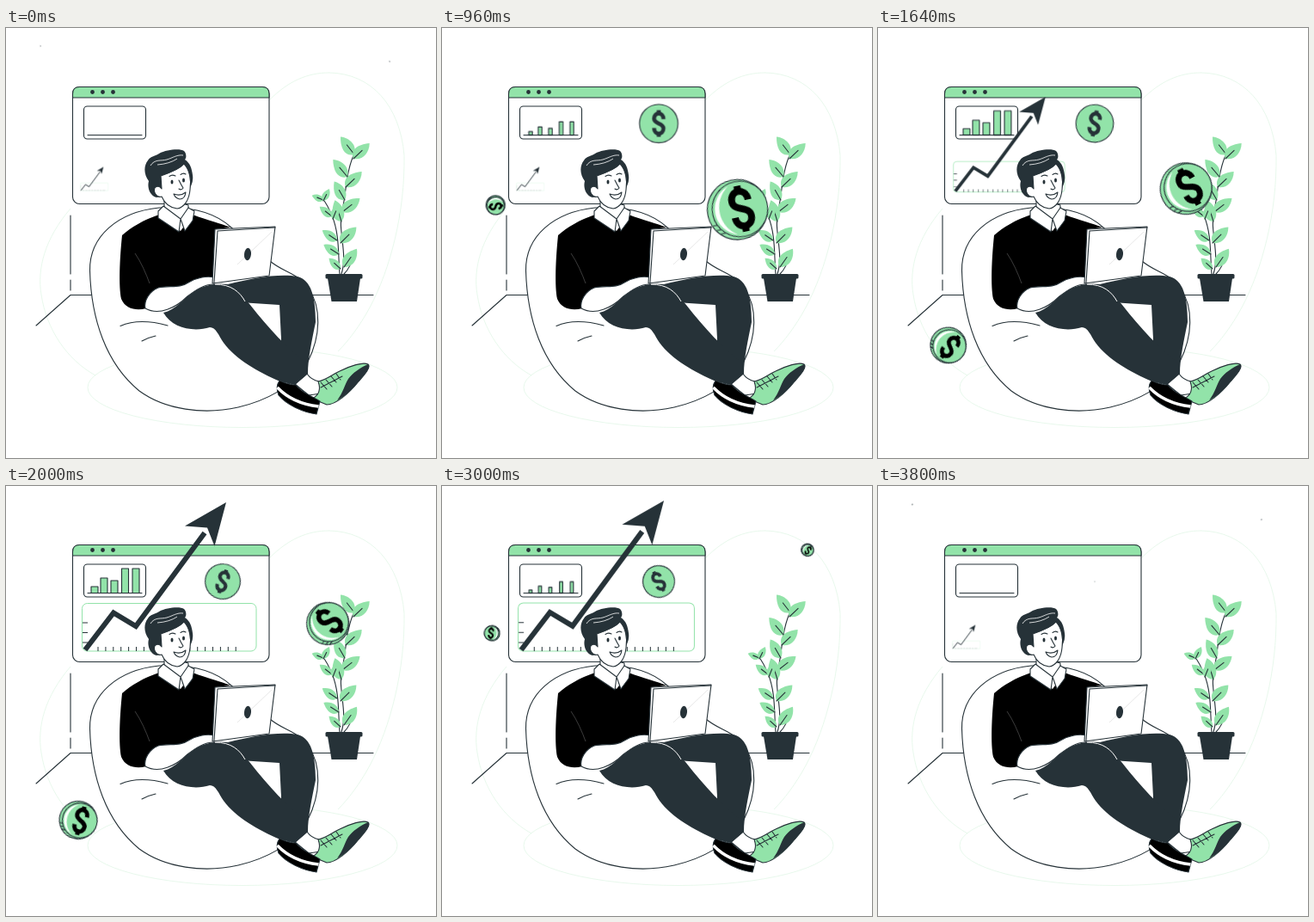
Animation of 500x500 px, one loop 3840 ms. Source, as an HTML page without scripts:

```html
<!DOCTYPE html>
<html lang="en">
<head>
<meta charset="utf-8">
<title>Growing income</title>
<style>
  html, body { margin: 0; width: 100%; height: 100%; overflow: hidden; background: #fff; }
  svg { display: block; width: 100%; height: 100%; }

  .ink { stroke: #263238; stroke-width: 1.1; stroke-linecap: round; stroke-linejoin: round; }
  .ink, .ink * { vector-effect: non-scaling-stroke; }
  .line { fill: none; }
  .white { fill: #fff; }
  .green { fill: #92e3a9; }
  .dark { fill: #263238; }
  .black { fill: #000; }
  .faint { fill: none; stroke: #e2f6e8; stroke-width: .8; }

  .move { animation: 3840ms cubic-bezier(.33, 0, .67, 1) infinite; }
  .spin { animation: 3840ms linear infinite; }

  .near { animation-name: near; }
  @keyframes near {
    0%, 100% { transform: translate(446px, 39px) scale(0); }
    25% { transform: translate(344px, 211px) scale(1); }
  }
  .near-spin { animation-name: near-spin; }
  @keyframes near-spin {
    0% { transform: rotate(-200deg); }
    16.67% { transform: rotate(-78deg); }
    25% { transform: rotate(-12deg); }
    33.33% { transform: rotate(-4deg); }
    52.08% { transform: rotate(-52deg); }
    62.5% { transform: rotate(0deg); }
    78.13% { transform: rotate(35deg); }
    100% { transform: rotate(80deg); }
  }

  .far { animation-name: far; }
  @keyframes far {
    0%, 100% { transform: translate(40px, 21px) scale(0); }
    50% { transform: translate(84.5px, 390.500px) scale(.63); }
  }
  .far-spin { animation-name: far-spin; }
  @keyframes far-spin {
    0% { transform: rotate(140deg); }
    16.67% { transform: rotate(100deg); }
    33.33% { transform: rotate(65deg); }
    52.08% { transform: rotate(15deg); }
    62.5% { transform: rotate(-40deg); }
    78.13% { transform: rotate(-175deg); }
    100% { transform: rotate(-330deg); }
  }

  .badge { animation-name: badge; }
  @keyframes badge {
    0%, 100% { transform: translate(252px, 111px) scale(0); }
    33.33% { transform: translate(252px, 111px) scale(1); }
    47%, 73% { transform: translate(252px, 111px) scale(.77); }
  }
  .badge-spin { animation-name: badge-spin; }
  @keyframes badge-spin {
    0%, 33.33% { transform: rotate(0deg); }
    52.08% { transform: rotate(18deg); }
    62.5% { transform: rotate(-35deg); }
    78.13%, 100% { transform: rotate(-28deg); }
  }

  .bar { animation-name: bar; transform-box: fill-box; transform-origin: 50% 100%; }
  @keyframes bar {
    0%, 2%, 94%, 100% { transform: scale(0); }
    45.5%, 60.5% { transform: scale(1); }
  }

  .chart { animation-name: chart; transform-origin: 86.2px 188.6px; }
  @keyframes chart {
    0%, 37.5%, 92.7%, 100% { transform: scale(.16); }
    47.9%, 82.3% { transform: scale(1.11); }
    52%, 77.1% { transform: scale(1); }
  }
</style>
</head>
<body>
<svg viewBox="0 0 500 500">
  <defs>
    <g id="dollar" fill="none" stroke-width="8">
      <path d="M9.500 -9C9.500 -24 -9.500 -24 -9.500 -10C-9.500 2 9.500 -2 9.500 10C9.500 24 -9.500 24 -9.500 9"/>
      <path d="M0 -27V-18M0 18V27"/>
    </g>
    <g id="coin">
      <circle class="ink green" cx="-.5" r="35"/>
      <path class="ink line" d="M-32 13L-27 13M-29 19L-24 19M-25 24L-20 24"/>
      <circle class="ink green" cx="2.500" r="32.300"/>
      <path class="white" d="M-6 -28.500A30 30 0 0 0 -6 28.500A34 34 0 0 1 -6 -28.500Z"/>
      <use href="#dollar" x="4.500" stroke="#000"/>
    </g>
    <g id="leaf">
      <path class="green" d="M0 0C-10 -4 -9 -15 0 -26C8 -18 9 -6 0 0Z"/>
      <path class="ink line" d="M0 0V-14"/>
    </g>
  </defs>

  <!-- backdrop -->
  <path class="faint" d="M75 210C45 245 36 280 41 310C47 350 70 385 104 404M306 84C328 62 350 52 376 52C425 53 458 90 463 148C464 215 447 280 423 325C411 347 398 364 386 376"/>
  <ellipse class="faint" cx="275" cy="418" rx="180" ry="46.5"/>
  <path class="ink line" d="M75 218V286M75 293V305M35 346L75 310.500H427"/>

  <!-- browser window -->
  <rect class="ink white" x="77.500" y="68.500" width="228.500" height="136" rx="8"/>
  <path class="ink green" d="M77.500 81V76.500Q77.500 68.500 85.500 68.500H298Q306 68.500 306 76.500V81Z"/>
  <g class="dark">
    <circle cx="100.500" cy="74.500" r="2.400"/><circle cx="112.500" cy="74.500" r="2.400"/><circle cx="124.500" cy="74.500" r="2.400"/>
  </g>
  <rect class="ink line" x="90.500" y="91" width="72" height="38" rx="4"/>
  <g class="ink green">
    <rect class="move bar" x="99" y="117" width="8" height="7.500"/>
    <rect class="move bar" x="110" y="107" width="8" height="17.500"/>
    <rect class="move bar" x="122" y="110" width="8" height="14.500"/>
    <rect class="move bar" x="134.500" y="96" width="8" height="28.500"/>
    <rect class="move bar" x="147" y="96" width="8" height="28.500"/>
  </g>
  <path class="ink line" d="M95 124.500H158"/>

  <g class="move badge"><g class="spin badge-spin">
    <circle class="ink green" r="26.500"/>
    <use href="#dollar" transform="scale(.68)" stroke="#263238"/>
  </g></g>

  <g class="move chart">
    <rect class="line" x="88.500" y="136.500" width="202.500" height="55.500" rx="6" stroke="#92e3a9"/>
    <path class="line" d="M92 187.500V148" stroke="#263238" stroke-width="6" stroke-dasharray="1 10.500" stroke-dashoffset="-5"/>
    <path class="line" d="M106.500 189.500H268" stroke="#263238" stroke-width="5" stroke-dasharray="1 7.900"/>
    <path class="line" d="M92 190.500L125 147.500L151 163L231 54.500" stroke="#263238" stroke-width="6"/>
    <path class="dark" d="M256 19L208 46.500L234 48.500L242.500 70Z"/>
  </g>

  <!-- plant -->
  <g class="ink line">
    <path d="M390 286C398 262 385 235 391 212C396 190 395 166 406 144"/>
    <path d="M388 286C386 262 388 240 379 218Q374 206 368 198"/>
    <path d="M393 286Q401 278 403 266"/>
  </g>
  <use href="#leaf" transform="translate(405 147) rotate(-38)"/>
  <use href="#leaf" transform="translate(404 152) rotate(46)"/>
  <use href="#leaf" transform="translate(397 173) rotate(-40)"/>
  <use href="#leaf" transform="translate(395 185) rotate(46)"/>
  <use href="#leaf" transform="translate(394 200) rotate(-30) scale(.95)"/>
  <use href="#leaf" transform="translate(391 214) rotate(52)"/>
  <use href="#leaf" transform="translate(390 225) rotate(-17)"/>
  <use href="#leaf" transform="translate(389 250) rotate(45)"/>
  <use href="#leaf" transform="translate(393 278) rotate(35)"/>
  <use href="#leaf" transform="translate(369 200) rotate(-68) scale(.55)"/>
  <use href="#leaf" transform="translate(369 201) rotate(26) scale(.6)"/>
  <use href="#leaf" transform="translate(379 219) rotate(-52) scale(.7)"/>
  <use href="#leaf" transform="translate(380 222) rotate(22) scale(.7)"/>
  <use href="#leaf" transform="translate(385 247) rotate(-56) scale(.8)"/>
  <use href="#leaf" transform="translate(387 263) rotate(-58) scale(.8)"/>
  <use href="#leaf" transform="translate(389 280) rotate(-48) scale(.7)"/>
  <rect class="dark" x="371.500" y="286" width="43" height="5.500" rx="1.500"/>
  <path class="dark" d="M374 291H412L408 318H378.500Z"/>

  <g class="move near"><use class="spin near-spin" href="#coin"/></g>

  <!-- bean bag -->
  <path class="ink white" d="M178 209C130 214 97 242 97.500 282C99 338 116 390 155 422C185 444 230 450 270 441C300 434 335 418 351 388C366 358 367 325 352 303C340 285 322 284 307 271L262 232C243 214 215 207 178 209Z"/>
  <path class="ink line" d="M133 346.500C150 339 170 341 188 346M158 364Q165 360 174 358"/>

  <!-- sweater -->
  <path class="black" d="M178 217C160 223 145 232 135 241C132 270 131 300 134 315C139 327 152 329 163 326L184 302L241 296L244 234L261 232C250 227 235 224 217 217L203 236Z"/>
  <path class="line" d="M150 262C157 272 163 286 167 297" stroke="#666" stroke-width=".6"/>

  <!-- head -->
  <path class="dark" d="M175 197C167 195 164 185 166 178C160 170 160 160 165 154C168 149 174 149 178 146C187 141 203 140 207 143C210 146 210 151 208 153C214 157 216 163 217 171Q218 178 215 184L180 196Z"/>
  <path class="ink white" d="M184 199V208L178 214L203 224L212 213V206Z"/>
  <path class="ink white" d="M180 172C189 169 201 165 207 158C213 164 216 176 214 188C213 200 207 209 199 210C190 209 184 203 181 196C175 198 171 190 173 186C175 183 179 184 181 187Z"/>
  <path class="line" d="M168 160C173 152 180 155 187 153S199 147 206 148M176 159Q190 158 199 152" stroke="#fff" stroke-width=".8"/>
  <g class="ink line">
    <path d="M190 172.500Q193 170 197 172M203 170.500Q206 168 209 170"/>
    <path d="M201 177Q204 183 206 186Q204 189 201 187"/>
    <path class="white" d="M195 193Q203 196 209 191Q208 199 202 199Q197 198 195 193Z"/>
  </g>
  <ellipse class="dark" cx="193" cy="179" rx="1.500" ry="2.600"/>
  <ellipse class="dark" cx="206.500" cy="177" rx="1.500" ry="2.600"/>
  <path class="ink white" d="M177 213L183 207L203 222L201 237L177 221ZM203 222L212 209L219 213L217 224L208 236Z"/>

  <!-- far leg and foot -->
  <path class="dark" d="M258 298C285 291 318 285 339 289C355 293 360 313 360 342C356 362 351 384 351 402L337 415L316 390L320 362L318 322L272 319Z"/>
  <path class="white" d="M278 319Q298 324 318 322Q316 344 320 363Q300 344 278 319Z"/>
  <path class="ink white" d="M336 414L350 402C354 408 359 410 364 411L366 425L352 427Z"/>
  <path class="ink green" d="M363 411C373 409 379 403 388 399C400 393 415 388 421 391C425 394 417 403 410 411C398 426 383 438 373 438L356 431Q368 425 363 411Z"/>
  <path class="dark" d="M421 391C425 394 417 403 410 411C402 421 393 429 385 433C392 424 394 414 398 408C403 401 412 395 421 391Z"/>
  <path class="ink line" d="M366 412L373 420M372 409L379 417M378 405L384 412M384 402L389 409M366 418L391 405"/>

  <!-- near leg and foot -->
  <path class="dark" d="M183 331C197 328 207 314 219 306C231 298 253 295 264 300C274 305 277 314 284 322C306 350 326 371 349 390L351 402L336 415L319 411C293 400 267 385 253 366C247 357 244 348 237 348C218 354 193 349 183 331Z"/>
  <path class="line" d="M243 298C262 298 272 307 278 318" stroke="#fff"/>
  <path class="ink black" d="M318 410C325 413 331 415 337 415C344 424 356 428 365 434L361 449C345 447 326 438 317 427Q313 417 318 410Z"/>
  <path class="line" d="M315.500 418C328 431 345 438 363.500 440" stroke="#fff" stroke-width="3.500"/>

  <!-- forearm and laptop -->
  <path class="ink white" d="M162 326C160 317 167 306 177 302C190 299 202 303 212 296C222 290 234 288 242 290V298C230 298 220 305 211 312C198 325 178 335 162 326Z"/>
  <path class="ink white" d="M243 234L240 297L306 288L313 231Z"/>
  <path class="ink line" d="M246 236L242 296M246 236L313 232"/>
  <path class="line" d="M269 275L309 237" stroke="#ddd" stroke-width=".7"/>
  <ellipse class="dark" cx="281" cy="263" rx="4" ry="7.200" transform="rotate(5 281 263)"/>

  <g class="move far"><use class="spin far-spin" href="#coin"/></g>
</svg>
</body>
</html>
```
